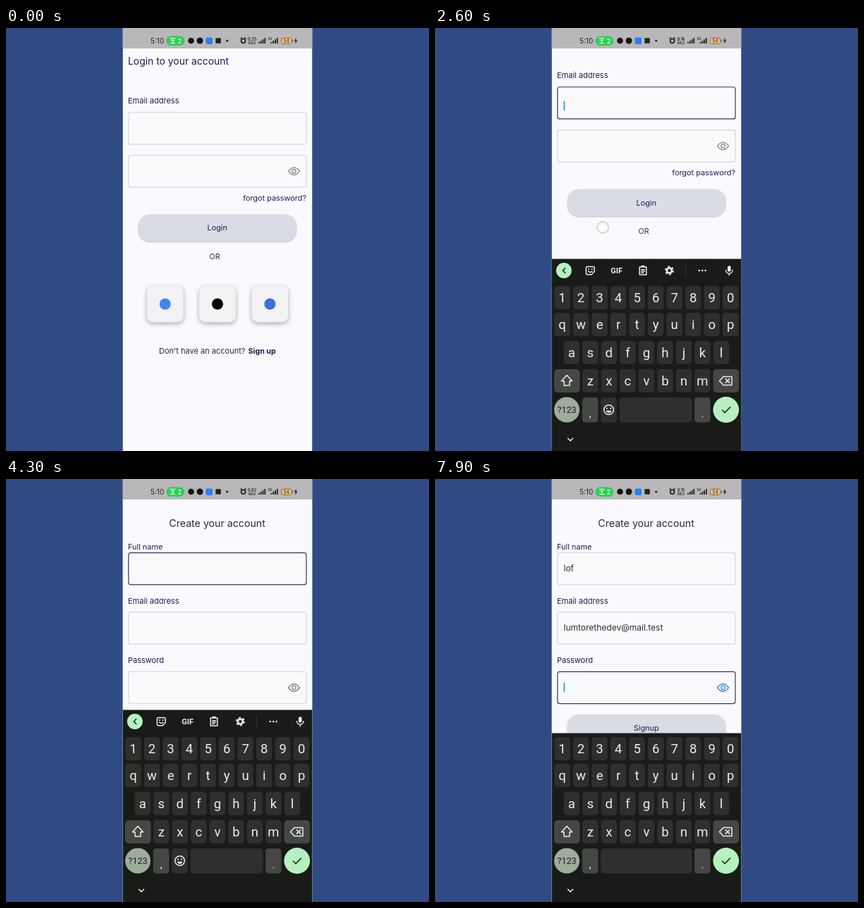
Animation, 600 px wide and 600 px high, one loop 8 s. Source, as an HTML page:

```html
<!DOCTYPE html>
<html lang="en">
<head>
<meta charset="utf-8">
<title>Sign-up flow</title>
<style>
  html, body { margin: 0; width: 100%; height: 100%; overflow: hidden; background: #304b83; }
  svg { display: block; width: 100vw; height: 100vh; }
  text { font-family: Inter, sans-serif; white-space: pre; }
  .kb text { font-family: Roboto, sans-serif; fill: #eceeec; }
  .btn { filter: drop-shadow(0 1px 1px #0004); }
  .card { filter: drop-shadow(0 2px 3px #0005); }
  .line { fill: none; stroke-linecap: round; stroke-linejoin: round; }
</style>
</head>
<body>
<svg id="stage" viewBox="0 0 600 600"></svg>
<script>
const LOOP = 8000, STEP = 100;
const INK = '#1b1f55', DARK = '#2b2b33', KEY = '#2d302d', KEY2 = '#444744', KB = '#181b18', MINT = '#b7f0c0';
const EDGE = '#dbdbe1', FOCUS = '#32375f', ERROR = '#c32f35', BLUE = '#2f8be6';

// Markup helpers
const rect = (x, y, w, h, r, fill, more = '') =>
  `<rect x="${x}" y="${y}" width="${w}" height="${h}" rx="${r}" fill="${fill}" ${more}/>`;
const disc = (x, y, r, fill, more = '') => `<circle cx="${x}" cy="${y}" r="${r}" fill="${fill}" ${more}/>`;
const text = (x, y, s, size, fill = INK, more = '') =>
  `<text x="${x}" y="${y}" font-size="${size}" fill="${fill}" ${more}>${s}</text>`;
const mid = (x, y, s, size, fill, more = '') => text(x, y, s, size, fill, 'text-anchor="middle" ' + more);
const line = (d, color = '#eceeec', w = 1.5, more = '') =>
  `<path class="line" d="${d}" stroke="${color}" stroke-width="${w}" ${more}/>`;
const group = (id, body, more = '') => `<g id="${id}" ${more}>${body}</g>`;
const field = (id, y) => rect(173.8, y, 252.2, 45.2, 3, '#faf9fc', `id="${id}" stroke="${EDGE}" stroke-width="1.4"`);
const eye = (id, y) => group(id, line(`M400.5 ${y}Q408.5 ${y - 10.5} 416.5 ${y}Q408.5 ${y + 10.5} 400.5 ${y}Z`, 'inherit', 1.3) +
  disc(408.5, y, 2.7, 'none', 'stroke-width="1.3"'), 'stroke="#85858a"')
  .replace('stroke="inherit" ', '');
const button = (y, s) => rect(188, y, 224, 38, 16, '#d9dce4', 'class="btn"') + mid(299.7, y + 22.8, s, 10.9);

function statusBar() {
  const bars = x => [0, 1, 2, 3].map(i => rect(x + i * 2.8, 20 - i * 2, 1.8, 2 + i * 2, .3, '#222')).join('');
  return rect(165.5, 0, 269, 29, 0, '#b9b7b9') +
    text(205, 22, '5:10', 10, '#222') +
    rect(227.5, 11.5, 25.5, 13.5, 6.5, '#2fcf55') +
    line('M233 14.5H240M234.3 17H238.7M236.5 17V20M233.5 21.5H239.5', '#fff', 1.2) + text(243.5, 21.6, '2', 9.5, '#fff') +
    disc(262.5, 18, 4.3, '#151515') + disc(275, 18, 4.5, '#151515') +
    rect(283.5, 13.5, 9.5, 9.5, 2, '#2880f3') + rect(297.3, 14.3, 7.5, 7.5, 1, '#222') + disc(313.7, 18, 1.6, '#222') +
    disc(336.6, 18.3, 3, 'none', 'stroke="#222" stroke-width="1.7"') + line('M333 14.8l1.4-1.2M340.2 14.8l-1.4-1.2', '#222', 1.3) +
    mid(349, 17.6, '', 5.6, '#222', 'id="speed" font-weight="600"') + mid(349, 22.8, 'KB/S', 4.2, '#222', 'font-weight="600"') +
    bars(358) + mid(374.5, 17, '5G', 4.4, '#222', 'font-weight="600"') + bars(375.5) +
    rect(390.5, 14, 14.5, 8.4, 2.5, '#f2c27c', 'stroke="#6d5b45" stroke-width=".8"') + mid(397.8, 20.7, '54', 7, '#333') +
    rect(405.6, 16.5, 1.2, 3.4, .5, '#6d5b45') + '<path d="M412 13.5l-3.4 5h2.2l-.9 4.2 3.6-5.2h-2.3z" fill="#222"/>';
}

function loginPage() {
  const card = (x, color) => rect(x - 26, 365.5, 52, 52, 9, '#f2f1f4', 'class="card"') + disc(x, 391.5, 8, color);
  return text(173, 52, 'Login to your account', 13.9) + text(173, 107, 'Email address', 11) +
    field('user', 119.6) + text(182.5, 146, '', 12, DARK) + field('pass', 180.6) + eye('loginEye', 203.2) +
    text(426, 245, 'forgot password?', 10.9, INK, 'text-anchor="end"') +
    button(264.6, 'Login') + mid(296, 328, 'OR', 10.6, DARK) +
    card(225.7, '#4285f4') + card(300, '#000') + card(374.4, '#3b6fe0') +
    text(217, 461.5, "Don't have an account?", 11, DARK) +
    text(343.5, 461.5, 'Sign up', 10.7, INK, 'font-weight="700"');
}

function signupPage() {
  return rect(165.5, 29, 269, 571, 0, '#faf9fd') + mid(299.6, 68, 'Create your account', 14.2, DARK) +
    text(173, 100, 'Full name', 10.9) + field('name', 104.6) + text(182.5, 131, '', 12, DARK, 'id="nameText"') +
    text(173, 176.8, 'Email address', 11) + field('mail', 189) + text(182.5, 215.2, '', 12, DARK, 'id="mailText"') +
    text(182.5, 250.2, 'Enter a valid email', 9.5, ERROR, 'id="warn"') +
    group('rest', text(173, 261, 'Password', 11) + field('secret', 273.4) + eye('eye', 296) + button(334, 'Signup'));
}

const keyPos = {};
function keyboard() {
  const pitch = 26.52;
  const row = (chars, x0, y) => [...chars].map((c, i) => {
    const x = x0 + i * pitch;
    keyPos[c] = [x, y];
    return rect(x - 11.3, y - 16.5, 22.6, 33, 4.5, KEY) + mid(x, y + 6.4, c, 18.5);
  }).join('');
  const base = rect(165.5, 360.5, 269, 240, 0, KB) +
    row('1234567890', 180.5, 382.5) + row('qwertyuiop', 180.5, 420.5) +
    row('asdfghjkl', 193.8, 460.3) + row('zxcvbnm', 220.3, 500.3) +
    rect(169, 484, 36.5, 33, 5, KEY2) + line('M187 492.5l-7.6 8.2h3.7v6.3h7.8v-6.3h3.7z') +
    rect(394.5, 484, 36.5, 33, 5, KEY2) + line('M409 494.5h12v12h-12l-5.5-6zM412.3 497.7l5.4 5.4M417.7 497.7l-5.4 5.4') +
    disc(187, 541.5, 18, '#9eac9c') + mid(187, 546, '?123', 12.5, '', 'style="fill:#1c211c"') +
    rect(208.8, 524, 22.6, 35.5, 4.5, KEY2) + mid(220.2, 552, ',', 15) +
    rect(235, 524, 129.5, 35.5, 4.5, KEY, 'id="space"') +
    group('smile', rect(235.2, 524, 22.6, 35.5, 4.5, KEY) + disc(246.5, 541.5, 6.8, 'none', 'stroke="#eceeec" stroke-width="1.5"') +
      disc(244, 539.5, 1.1, '#eceeec') + disc(249, 539.5, 1.1, '#eceeec') + '<path d="M242.6 542.7h7.8a4 4 0 0 1-7.8 0z" fill="#eceeec"/>') +
    rect(368, 524, 22.6, 35.5, 4.5, KEY2) + mid(379.4, 552, '.', 15) +
    disc(412.8, 541.5, 18.4, MINT) + line('M407.5 542l3.6 3.6 7.6-7.8', '#1c2b1f', 1.6) +
    line('M188.5 582l3.5 3.5 3.5-3.5');

  const tools = group('tools',
    line('M184.7 340.5l-3.4 3.5 3.4 3.5', '#1c2b1f', 1.6) +
    line('M216 338.5h8.5a1.6 1.6 0 0 1 1.6 1.6v5.4l-4.2 4.3h-5.9a1.6 1.6 0 0 1-1.6-1.6v-8.1a1.6 1.6 0 0 1 1.6-1.6zM217.5 345q2.6 3 5.4 0') +
    disc(218, 342, 1, '#eceeec') + disc(222.6, 342, 1, '#eceeec') +
    mid(257.7, 348, 'GIF', 11, '', 'font-weight="700"') +
    line('M290.2 339h9.6v11h-9.6zM293 339v-1.4h4v1.4M292.7 342.7h4.6M292.7 345h4.6M292.7 347.3h3') +
    disc(332.4, 344, 3.5, 'none', 'stroke="#eceeec" stroke-width="2.6"') +
    disc(332.4, 344, 5.6, 'none', 'stroke="#eceeec" stroke-width="1.7" stroke-dasharray="2.9 2.96"') +
    rect(355.2, 336, .8, 16, 0, '#3a3d3a') +
    [374.8, 379.2, 383.6].map(x => disc(x, 344, 1.3, '#eceeec')).join(''));

  const hints = group('hints', line('M181.3 340.5l3.4 3.5-3.4 3.5', '#1c2b1f', 1.6) +
    rect(262.8, 336, .8, 17, 0, '#3a3d3a') + rect(335.8, 336, .8, 17, 0, '#3a3d3a') +
    [230, 299, 368].map((x, i) => mid(x, 349.5, '', 14, '', `id="hint${i}"`)).join('') +
    group('emoji', rect(368, 336, .8, 17, 0, '#3a3d3a') + disc(352.3, 344, 7, '#45b566') +
      line('M348.5 347.5h7.6M348.5 345h2.3a2.4 2.4 0 1 1 3 0h2.3', '#fff', 1.1) +
      line('M385.3 338v12M382 350.5h6.6M379.5 340.3h11.6M379.5 340.3l-2 5h4zM391.1 340.3l-2 5h4z', '#6f9bb3', 1.1)));

  const bar = group('bar', rect(165.5, 327.5, 269, 34, 0, KB) + disc(182.8, 344, 11, MINT) + tools + hints +
    rect(415, 337.3, 4.6, 8.4, 2.3, '#eceeec') + line('M412.6 343.5a4.7 4.7 0 0 0 9.4 0M417.3 348.2v2.6', '#eceeec', 1.4));
  const popup = group('popup', rect(-11.3, -16.5, 22.6, 33, 4.5, KB, 'opacity=".8"') + disc(0, -40.5, 16.5, KEY) +
    mid(0, -34, '', 19.5, '', 'id="popText"') + [-3, 0, 3].map(x => disc(x, -25.3, .9, '#eceeec')).join(''));
  return base + bar + popup;
}

const $ = id => document.getElementById(id);
$('stage').innerHTML =
  '<clipPath id="phone"><path d="M165.5 0h269v600h-269z"/></clipPath>' +
  rect(0, 0, 600, 600, 0, '#304b83') +
  `<g clip-path="url(#phone)">${rect(165.5, 0, 269, 600, 0, '#faf9fd')}` +
  group('login', loginPage()) + group('signup', signupPage()) +
  rect(0, 0, 1.6, 13.5, 0, BLUE, 'id="caret"') +
  statusBar() + group('kb', keyboard(), 'class="kb"') +
  disc(0, 0, 8, '#fff', 'id="touch" fill-opacity=".72" stroke="#777" stroke-opacity=".3" stroke-width="1.8"') + '</g>';

// Timeline: each entry holds until the next
const speeds = [[0, '0.25'], [1300, '0.16'], [3700, '0.82'], [4900, '3.00'], [7400, '0.15']];
const focuses = [[0, ''], [1100, 'user'], [3500, ''], [3900, 'name'], [5200, 'mail'], [7600, 'secret']];
const names = [[0, ''], [4500, 'l'], [4700, 'lo'], [5000, 'lof']];
const mails = [[0, ''], [5400, 'l'], [5600, 'lu'], [5800, 'lum'], [6000, 'lumt'], [6700, 'lumtore '], [6900, 'lumtore'],
  [7000, 'lumtoret'], [7100, 'lumtoreth'], [7200, 'lumtorethe'], [7400, 'lumtorethedev@mail.test']];
const hintList = [[0, ''], [4500, 'l,lump,lof'], [4700, 'lo,look,lof'], [5000, 'lof,loft,loaf'], [5200, ''],
  [5400, 'l,lump,lof'], [5600, 'lu,luck,lump'], [5800, 'lum,lumtore,lump'], [6700, 'Kwidu,League,'],
  [7000, 't,the,to'], [7100, 'th,the,this'], [7200, 'the,thedev,them'], [7400, '']];
const taps = [[1000, 262, 146], [3400, 363, 319], [3800, 300, 128], [4400, 'l'], [4600, 'o'], [4900, 'f'], [5100, 290, 212],
  [5300, 'l'], [5500, 'u'], [5700, 'm'], [5900, 't'], [6600, 321, 352], [6800, 414, 502],
  [6900, 't'], [7000, 'h'], [7100, 'e'], [7300, 305, 350], [7500, 290, 297]];

const last = (list, t) => list.filter(e => e[0] <= t).pop();
const at = (list, t) => last(list, t)[1];
const ease = (t, a, b) => {
  const p = Math.min(1, Math.max(0, (t - a) / (b - a)));
  return p * p * (3 - 2 * p);
};
const set = (id, attrs) => { for (const k in attrs) $(id).setAttribute(k, attrs[k]); };
const show = (id, on) => set(id, { visibility: on ? 'inherit' : 'hidden' });
const move = (id, x, y) => set(id, { transform: `translate(${x} ${y})` });

function render(t) {
  if (t === 3300 || t === 4800) t -= STEP; // two held steps
  const focus = at(focuses, t), mail = at(mails, t), secret = focus === 'secret';
  const bad = mail !== '' && !mail.includes('@');
  const scroll = 138.3 * ease(t, 2400, 3000);

  $('speed').textContent = at(speeds, t);
  $('nameText').textContent = at(names, t);
  $('mailText').textContent = mail;

  move('login', 0, -scroll);
  show('login', t < 3800);
  set('signup', { opacity: ease(t, 3400, 3700) });
  show('signup', t > 3400);
  for (const id of ['user', 'name', 'mail', 'secret']) {
    const err = id === 'mail' && bad;
    set(id, { stroke: err ? ERROR : id === focus ? FOCUS : EDGE, 'stroke-width': err ? 1.9 : id === focus ? 1.2 : 1.4, rx: err ? 6 : 3 });
  }
  show('warn', bad);
  move('rest', 0, bad ? 19.3 : 0);
  set('eye', { stroke: secret ? BLUE : '#85858a' });

  const carets = { user: 139.5 - scroll, name: 120, mail: 204.5, secret: 289 };
  const typed = focus === 'name' || focus === 'mail' ? $(focus + 'Text').getComputedTextLength() : 0;
  show('caret', focus && t % 1000 >= 500 && (focus !== 'user' || scroll < 100));
  move('caret', 182.5 + typed, carets[focus] || 0);

  const open = ease(t, 1100, 1500) - ease(t, 3400, 3800) + ease(t, 3800, 4200);
  move('kb', 0, 273 * (1 - open));
  const hints = at(hintList, t), words = hints.split(',');
  show('bar', !secret);
  show('tools', !hints && !secret);
  show('hints', hints && !secret);
  show('emoji', hints && !words[2] && !secret);
  if (hints) words.forEach((w, i) => $('hint' + i).textContent = w);
  show('smile', !secret);
  set('space', secret ? { x: 235, width: 129.5 } : { x: 261.7, width: 102.8 });

  // Finger: a drag, or a tap that fades one step later
  const tap = last(taps, t), age = tap ? t - tap[0] : LOOP;
  const key = tap && keyPos[tap[1]];
  show('popup', key && age < STEP);
  if (key) {
    move('popup', ...key);
    $('popText').textContent = tap[1];
  }
  const drag = t >= 2400 && t <= 3000;
  show('touch', drag || age <= STEP);
  set('touch', { opacity: drag || age < STEP ? 1 : .12 });
  if (drag) move('touch', 238, 318.6 - scroll);
  else if (key) move('touch', key[0] + 8.5, key[1] + 12);
  else if (tap) move('touch', tap[1], tap[2]);
}

const start = performance.now();
function frame() {
  render(Math.floor((performance.now() - start) / STEP) * STEP % LOOP);
  requestAnimationFrame(frame);
}
frame();
</script>
</body>
</html>
```
